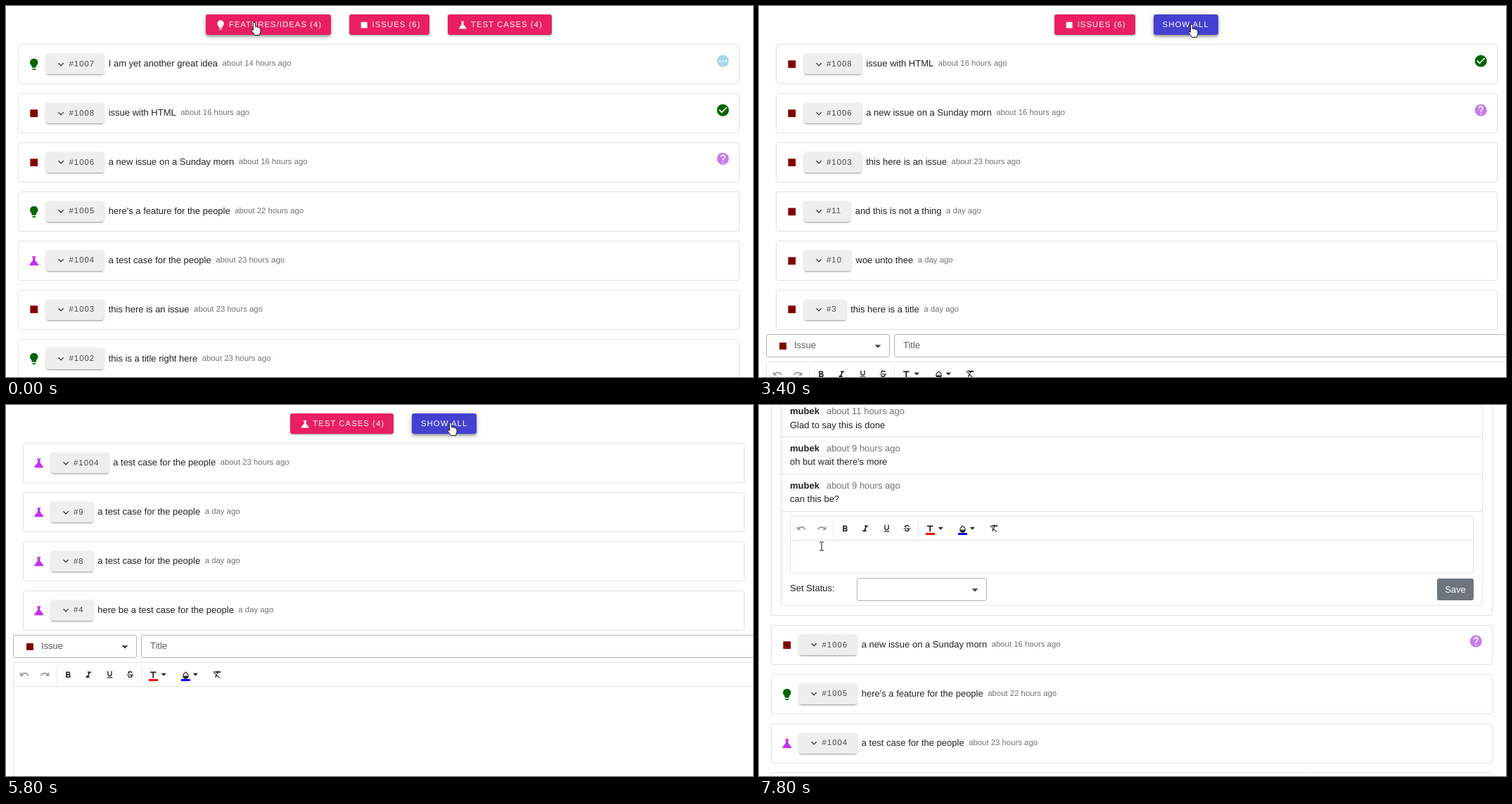
Recreate the animation shown at these times as an HTML page. Size 1062 by 528 pixels, loop 8000 ms.

```html
<!DOCTYPE html>
<html lang="en">
<head>
<meta charset="utf-8">
<title>Issue filters</title>
<style>
html, body { margin: 0; width: 100%; height: 100%; overflow: hidden; background: #fefefd; }
body { font: 13px/20px Arial, "Liberation Sans", sans-serif; color: #242424; text-rendering: geometricPrecision; }
#stage { position: relative; width: 1062px; height: 528px; overflow: hidden; }
.view, .page, .abs, .card, .cursor, .cursor svg { position: absolute; }
.view, .page { left: 0; top: 0; width: 1062px; height: 528px; }
.view { opacity: 0; }
.anim { animation: 8s step-end -20ms infinite; }
.bar { position: absolute; top: 12px; width: 1060px; display: flex; justify-content: center; gap: 26px; }
.btn {
  position: relative; box-sizing: border-box; height: 29.25px; padding: 0 13px; border-radius: 3.25px;
  display: flex; align-items: center; gap: 3.25px; flex: none; overflow: hidden; white-space: nowrap;
  font-size: 11.375px; letter-spacing: 1.0156px; color: #fff; background: #e91e63;
  box-shadow: 0 2.4px 1px -1.6px #0003, 0 1.6px 1.6px #00000024, 0 1px 4px #0000001f;
}
.btn.all { background: #4540d1; }
.btn.num { background: #eee; color: #484848; }
.ripple {
  position: absolute; left: 50%; top: 50%; width: 96px; height: 96px; margin: -48px; border-radius: 50%;
  background: #fff; opacity: 0; animation: ripple 8s step-end infinite;
}
@keyframes ripple {
  0% { opacity: .2; transform: scale(.5); }
  2.5% { opacity: .24; transform: none; }
  5% { opacity: 0; }
}
.card { left: 17px; width: 1026px; box-sizing: border-box; border: 1px solid #e2e2e2; border-radius: 3.25px; }
.row { height: 55px; padding-left: 12.25px; display: flex; align-items: center; white-space: nowrap; }
.row .btn { margin: 0 6.5px 0 7.25px; }
.row span { position: relative; top: -.5px; }
.row small, .who span { color: #747474; }
.row small { position: relative; top: -.5px; margin-left: 6.5px; font-size: 11.375px; }
.state { position: absolute; right: 12.2px; top: 12.4px; }
svg { display: block; flex: none; overflow: visible; }
.box { box-sizing: border-box; border: 1px solid #e2e2e2; border-radius: 3px; }
.field { border-color: #b4b4b4; color: #5c5c5c; }
.who b { margin-right: 10px; }
.save { background: #6c757d; color: #fff; border-radius: 3.25px; text-align: center; line-height: 31px; }
.cursor { left: 0; top: 0; }
</style>
</head>
<body>
<div id="stage"></div>
<script>
const PATHS = {
  bulb: 'M12,2A7,7 0 0,0 5,9C5,11.4 6.2,13.5 8,14.7V17A1,1 0 0,0 9,18H15A1,1 0 0,0 16,17V14.7C17.8,13.5 19,11.4 19,9A7,7 0 0,0 12,2M9,21A1,1 0 0,0 10,22H14A1,1 0 0,0 15,21V20H9Z',
  square: 'M5.4,5.4h13.2v13.2H5.4Z',
  flask: 'M19.8,18.4L14,10.7V6.5l1.35-1.7C15.6,4.5 15.4,4 15,4H9C8.6,4 8.4,4.5 8.65,4.8L10,6.5v4.2L4.2,18.4C3.7,19 4.2,20 5,20h14C19.8,20 20.3,19 19.8,18.4Z',
  down: 'M7.4,8.6L12,13.2L16.6,8.6L18,10L12,16L6,10Z',
  caret: 'M6,9.5L12,15.5L18,9.5Z',
  dots: 'M2,12a10,10 0 0 1 20,0a10,10 0 0 1-20,0M5.8,12a1.4,1.4 0 0 0 2.8,0a1.4,1.4 0 0 0-2.8,0M10.6,12a1.4,1.4 0 0 0 2.8,0a1.4,1.4 0 0 0-2.8,0M15.4,12a1.4,1.4 0 0 0 2.8,0a1.4,1.4 0 0 0-2.8,0',
  check: 'M2,12a10,10 0 0 1 20,0a10,10 0 0 1-20,0M10,17L19,8L17.6,6.6L10,14.2L6.4,10.6L5,12Z',
  help: 'M2,12a10,10 0 0 1 20,0a10,10 0 0 1-20,0M11,17h2v2h-2ZM8,9a4,4 0 0 1 8,0c0,.9-.4,1.7-.9,2.2l-.9,1C13.4,12.9 13,13.5 13,15h-2v-.5c0-1.1.5-2.1 1.2-2.8l1.2-1.3A2,2 0 1 0 10,9Z',
  undo: 'M12.5,8C9.9,8 7.5,9 5.6,10.6L2,7V16H11L7.4,12.4C8.8,11.2 10.5,10.5 12.5,10.5C16,10.5 19,12.8 20.1,16L22.5,15.2C21,11 17.2,8 12.5,8Z',
  bold: 'M13.5,15.5H10V12.5H13.5a1.5,1.5 0 0 1 0,3M10,6.5H13a1.5,1.5 0 0 1 0,3H10M15.6,10.8C16.6,10.1 17.2,9 17.2,8C17.2,5.7 15.5,4 13.2,4H7V18H14C16.1,18 17.7,16.3 17.7,14.2C17.7,12.7 16.9,11.4 15.6,10.8Z',
  italic: 'M10,4V7H12.2L8.8,15H6V18H14V15H11.8L15.2,7H18V4Z',
  under: 'M5,21H19V19H5ZM12,17a6,6 0 0 0 6-6V3H15.5V11a3.5,3.5 0 0 1-7,0V3H6V11a6,6 0 0 0 6,6Z',
  strike: 'M3,12H21V14H17.5C18.8,17.5 16.8,20.5 12.2,20.5C7.6,20.5 5.6,18 5.6,15.5H8.9C9,17 10,17.9 12.2,17.9C15.4,17.9 15.8,15.2 13.1,14H3ZM18,8H14.8C14.7,6.6 13.7,5.9 12,5.9C9,5.9 8.4,8.8 12,9.9H6.8C4.8,6.5 7.5,3.3 12,3.3C15.8,3.3 18,5.1 18,8Z',
  letter: 'M5,4V7H10.5V19H13.5V7H19V4Z',
  drop: 'M17.7,8L12,2.3L6.3,8C2.5,12 3.5,21.5 12,21.7C20.5,21.5 21.5,12 17.7,8M6,14C6,12 6.6,10.7 7.8,9.6L12,5.3L16.2,9.6C17.4,10.7 18,12 18,14Z',
  clear: 'M6,5V5.2L8.8,8H11.2L10.5,9.7L12.6,11.8L14.2,8H20V5ZM3.3,5L2,6.3L9,13.2L6.5,19H9.5L11,15.3L16.7,21L18,19.7Z'
};
const TYPES = {
  bulb: ['#006400', 'FEATURES/IDEAS (4)'],
  square: ['#800000', 'ISSUES (6)'],
  flask: ['#c52ef2', 'TEST CASES (4)']
};
const STATES = { dots: '#a9d8ea', check: '#006400', help: '#c67bf0' };

const items = [
  ['bulb', 1007, 'I am yet another great idea', 'about 14 hours ago', 'dots'],
  ['square', 1008, 'issue with HTML', 'about 16 hours ago', 'check'],
  ['square', 1006, 'a new issue on a Sunday morn', 'about 16 hours ago', 'help'],
  ['bulb', 1005, "here's a feature for the people", 'about 22 hours ago'],
  ['flask', 1004, 'a test case for the people', 'about 23 hours ago'],
  ['square', 1003, 'this here is an issue', 'about 23 hours ago'],
  ['bulb', 1002, 'this is a title right here', 'about 23 hours ago'],
  ['square', 11, 'and this is not a thing', 'a day ago'],
  ['square', 10, 'woe unto thee', 'a day ago'],
  ['flask', 9, 'a test case for the people', 'a day ago'],
  ['flask', 8, 'a test case for the people', 'a day ago'],
  ['bulb', 7, 'this here is another feature', 'a day ago'],
  ['flask', 4, 'here be a test case for the people', 'a day ago'],
  ['square', 3, 'this here is a title', 'a day ago']
];
const TOP = 54.3, PITCH = 69.875, CARD = 56.9, SCROLL = 188;

// Keyframe builders: a property switched on during spans, and a stepped path.
let css = '';
const pct = ms => ms / 80 + '%';
function during(name, spans, prop = 'opacity', on = 1, off = 0) {
  const body = spans.map(([a, b]) => `${pct(a)}{${prop}:${on}}` + (b < 8000 ? `${pct(b)}{${prop}:${off}}` : ''));
  css += `@keyframes ${name}{0%{${prop}:${off}}${body.join('')}}`;
}
function path(name, points) {
  const body = points.map(([ms, x, y], i) => {
    const next = points[i + 1] || [ms + 200];
    return `${pct(ms)}{transform:translate(${x}px,${y}px);animation-timing-function:steps(${(next[0] - ms) / 200})}`;
  });
  css += `@keyframes ${name}{${body.join('')}}`;
}
const lift = (name, ...spans) => during(name, spans, 'box-shadow',
  '0 2px 3px -1px #0004,0 3.2px 4px #0003,0 1px 8px #0000002b',
  '0 2.4px 1px -1.6px #0003,0 1.6px 1.6px #00000024,0 1px 4px #0000001f');

const icon = (name, size, fill, attrs = '') =>
  `<svg width="${size}" height="${size}" viewBox="0 0 24 24" ${attrs}><path fill="${fill}" fill-rule="evenodd" d="${PATHS[name]}"/></svg>`;
const at = (x, y, w, h, cls = '', html = '', style = '') =>
  `<div class="abs ${cls}" style="left:${x}px;top:${y}px;width:${w}px;height:${h}px;${style}">${html}</div>`;
const button = (cls, html, anim) =>
  `<div class="btn ${cls} ${anim ? 'anim' : ''}" ${anim ? `style="animation-name:${anim}"` : ''}>${html}</div>`;
const typeButton = (type, anim, extra = '') => button('', icon(type, 16.25, '#fff') + TYPES[type][1] + extra, anim);

function card([type, id, title, time, state], top, height = CARD, anim = '') {
  return `<div class="card" style="top:${top}px;height:${height}px"><div class="row">` +
    icon(type, 19.5, TYPES[type][0]) + button('num', icon('down', 16.25, '#333') + '#' + id, anim) +
    `<span>${title}</span><small>${time}</small></div>` +
    (state ? icon(state, 20.5, STATES[state], 'class="state"') : '') + '</div>';
}

function toolbar(x, y, w, h) {
  const put = (name, cx, cy = 17, fill = '#222', size = 14.6, attrs = '') =>
    at(cx - size / 2, cy - size / 2, size, size, '', icon(name, size, fill, attrs));
  const line = (lx, ly, lw, lh, fill) => at(lx, ly, lw, lh, '', '', 'background:' + fill);
  return at(x, y, w, h, 'box',
    put('undo', 15, 16, '#999') + put('redo' && 'undo', 44, 16, '#999', 14.6, 'style="transform:scaleX(-1)"') +
    put('bold', 77) + put('italic', 106.5) + put('under', 136, 16, '#222', 13) + put('strike', 165, 16, '#222', 13) +
    put('letter', 198.5, 17) + line(192, 23, 13, 3, '#f00') + put('caret', 213, 16) +
    put('drop', 244, 17, '#222', 13) + line(238, 23, 13, 3, '#00f') + put('caret', 258.5, 16) +
    put('clear', 289, 16) +
    line(0, 33, '100%" data-w="', 1, '#e2e2e2').replace('width:100%" data-w="px', 'width:100%') +
    line(60, 5, 1, 24, '#e8e8e8') + line(181, 5, 1, 24, '#e8e8e8'));
}

const caret = (x, y) => at(x, y, 18, 18, '', icon('caret', 18, '#444'));
function editor(top) {
  return at(10, top, 176, 33, 'box field',
      at(14, 7, 17, 17, '', icon('square', 18, '#800000')) + at(39, 5, 60, 20, '', 'Issue') + caret(149, 7)) +
    at(192, top, 900, 33, 'box field', at(12, 5, 60, 20, '', 'Title')) +
    toolbar(10, top + 39, 1100, 300);
}

const view = (name, html) => `<div class="view anim" style="animation-name:${name}">${html}</div>`;
const bar = html => `<div class="bar">${html}</div>`;
const allBar = (...anims) => bar(Object.keys(TYPES).map((type, i) => typeButton(type, anims[i])).join(''));

function filtered(name, type, start) {
  const list = items.filter(item => item[0] === type);
  const ripple = `<i class="ripple" style="animation-delay:${start - 20}ms"></i>`;
  return view(name,
    `<div class="page" style="left:6.5px">` +
    bar(typeButton(type, '', ripple) + button('all', 'SHOW ALL', name + 'Lift')) +
    list.map((item, i) => card(item, TOP + i * PITCH)).join('') + '</div>' +
    editor(Math.round(TOP + list.length * PITCH - 6.8)));
}

function expanded() {
  const y = v => v + SCROLL;
  const comments = [
    ['about 11 hours ago', 'Glad to say this is done'],
    ['about 9 hours ago', "oh but wait there's more"],
    ['about 9 hours ago', 'can this be?']
  ].map(([time, text], i) => {
    const top = y(-7.4 + i * 52.8);
    return at(44, top + 6.7, 500, 20, 'who', `<b>mubek</b><span>${time}</span>`) +
      at(44, top + 26, 500, 20, '', text) +
      at(31, Math.round(top + 52.4), 998, 1, '', '', 'background:#e2e2e2');
  }).join('');
  const top = TOP + PITCH;
  return view('openView', `<div class="page anim" style="animation-name:scroll">` +
    allBar() + card(items[0], TOP) + card(items[1], top, y(300) - top) +
    at(31, top + CARD, 998, y(286) - top - CARD, 'box') + comments +
    toolbar(44, y(158), 972, 82) +
    at(44, y(251), 90, 20, '', 'Set Status:') +
    at(139, y(246), 185, 33, 'box field', caret(158, 7)) +
    at(964, y(247), 52, 31, 'save', 'Save') +
    items.slice(2, 7).map((item, i) => card(item, y(313) + i * PITCH)).join('') + '</div>');
}

const shape = (d, anim) => `<svg class="anim" width="1" height="1" style="opacity:0;animation-name:${anim}">` +
  `<path d="${d}" fill="#fff" stroke="#111" stroke-linejoin="round"/></svg>`;

during('allView', [[0, 400], [1600, 2800], [4000, 4600], [6000, 7200]]);
during('ideaView', [[400, 1600]]);
during('issueView', [[2800, 4000]]);
during('testView', [[4600, 6000]]);
during('openView', [[7200, 8000]]);
lift('ideaLift', [0, 400]);
lift('issueLift', [2200, 2800]);
lift('testLift', [4200, 4600]);
lift('numLift', [6800, 7200]);
lift('ideaViewLift', [1200, 1600]);
lift('issueViewLift', [3200, 4000]);
lift('testViewLift', [4800, 6000]);
during('hand', [[0, 600], [800, 2800], [3200, 6200], [6800, 7400]]);
during('arrow', [[600, 800], [2800, 3200], [6200, 6800], [7400, 7600]]);
during('beam', [[7600, 8000]]);
path('scroll', [[0, 0, 0], [7200, 0, 0], [7800, 0, -SCROLL]]);
path('move', [
  [0, 353, 23], [400, 353, 23], [600, 365, 28], [1200, 628, 24], [1600, 630, 24], [1800, 662, 25],
  [2400, 546, 24], [2800, 546, 26], [3400, 615, 26], [4000, 616, 26], [4400, 672, 25], [4600, 672, 25],
  [5000, 628, 24], [5400, 632, 25], [6000, 632, 25], [6800, 86, 154], [7200, 86, 154], [7800, 89, 201]
]);

document.getElementById('stage').innerHTML =
  view('allView', allBar('ideaLift', 'issueLift', 'testLift') +
    items.slice(0, 7).map((item, i) => card(item, TOP + i * PITCH, CARD, i === 1 ? 'numLift' : '')).join('')) +
  filtered('ideaView', 'bulb', 400) + filtered('issueView', 'square', 2800) + filtered('testView', 'flask', 4600) +
  expanded() +
  '<div class="cursor anim" style="animation-name:move">' +
  shape('M-1.6,1.6a1.6,1.6 0 0 1 3.2,0V6.5q3,-.8 3.4,.7q2,-.4 2.4,1q1.6,0 1.6,1.8V13.5l-1.6,5H.6L-4,12.2q-.6,-2 1,-1.9l1.4,1.2Z', 'hand') +
  shape('M0,0V13L3,10.2L5.2,15L7.4,14L5.2,9.4H9Z', 'arrow') +
  shape('M-3,-6H-.5L0,-5.5L.5,-6H3M0,-5.5V5.5M-3,6H-.5L0,5.5L.5,6H3', 'beam') + '</div>';
document.head.appendChild(document.createElement('style')).textContent = css;
</script>
</body>
</html>
```
